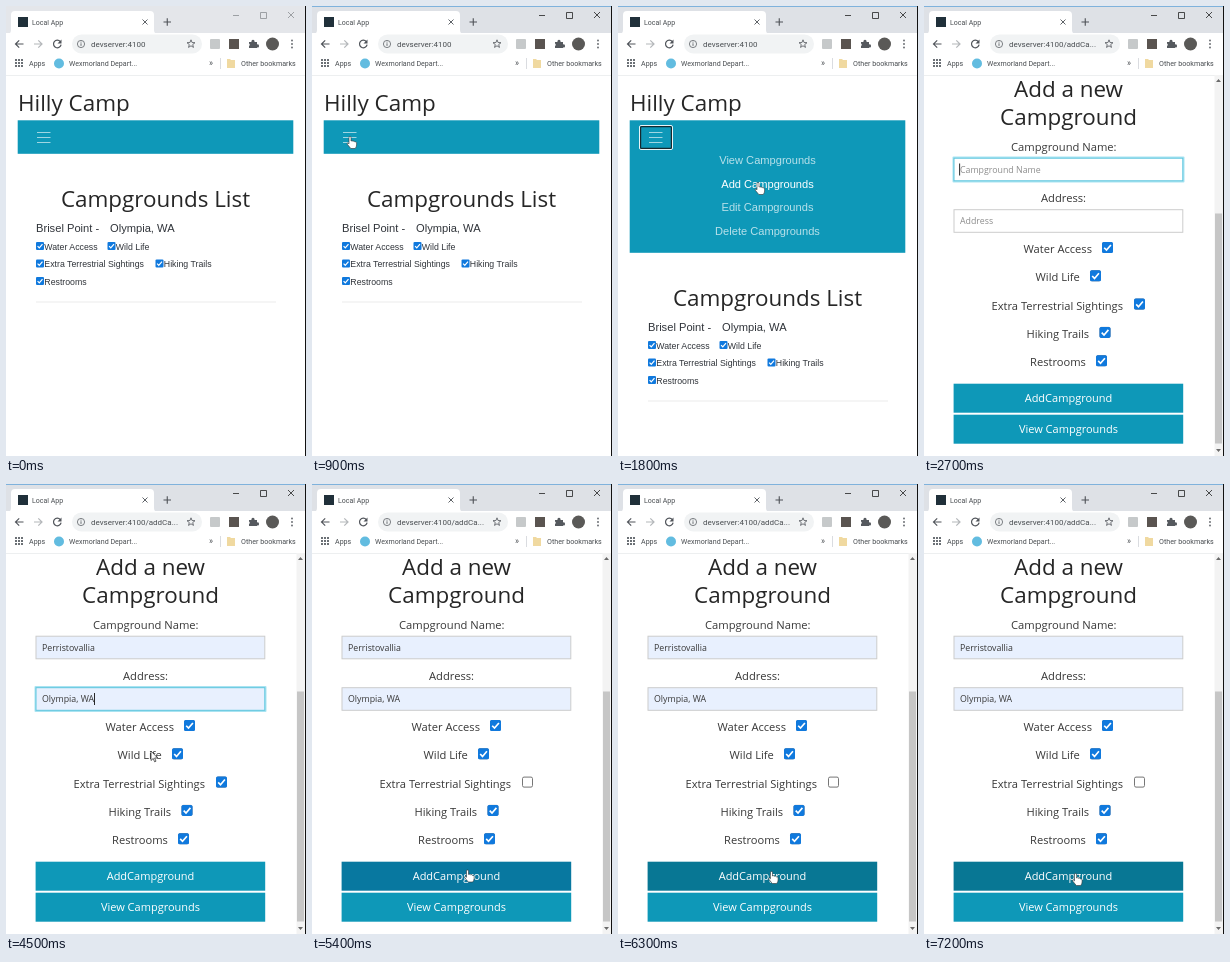
Recreate the animation shown at these times as an HTML page. Size 300 px wide and 450 px high, loop 8 s.

```html
<!DOCTYPE html>
<html lang="en">
<head>
<meta charset="utf-8">
<title>Campgrounds</title>
<style>
html, body { margin: 0; width: 100%; height: 100%; overflow: hidden; background: #fff; }
svg { display: block; width: 100%; height: 100%; }
text { white-space: pre; }
.ui { font-family: Roboto, sans-serif; fill: #4a4e52; }
.sans { font-family: "Liberation Sans", Arial, sans-serif; fill: #30343a; }
.open { font-family: "Open Sans", sans-serif; fill: #383838; }
.head { font-family: "Open Sans", sans-serif; fill: #262626; }
.mid { text-anchor: middle; }
</style>
</head>
<body>
<svg id="stage" viewBox="0 0 300 450"></svg>
<script>
const TEAL = '#0e98b8', HOVER = '#087794', BLUE = '#1079dd';
const STEP = 900, LOOP = 8000;

const rect = (x, y, w, h, fill, more = '') =>
  `<rect x="${x}" y="${y}" width="${w}" height="${h}" fill="${fill}" ${more}/>`;
const path = (d, stroke, width = 1, more = '') =>
  `<path d="${d}" fill="none" stroke="${stroke}" stroke-width="${width}" ${more}/>`;
const text = (cls, x, y, size, str, more = '') =>
  `<text class="${cls}" x="${x}" y="${y}" font-size="${size}" ${more}>${str}</text>`;
const group = (id, body, more = '') => `<g id="${id}" ${more}>${body}</g>`;
const dot = (x, y, r, fill) => `<circle cx="${x}" cy="${y}" r="${r}" fill="${fill}"/>`;

const tick = (x, y, s) => rect(x, y, s, s, BLUE, `rx="${s * .14}"`) +
  path(`M${x + s * .2} ${y + s * .52}l${s * .21} ${s * .22}l${s * .4} ${-s * .47}`, '#fff', s * .15);

function browser() {
  const star = Array.from({ length: 10 }, (_, i) => {
    const a = i * Math.PI / 5, r = i % 2 ? 1.8 : 4.2;
    return `${185 + r * Math.sin(a)},${38 - r * Math.cos(a)}`;
  }).join(' ');
  let apps = '';
  for (let i = 0; i < 9; i++) apps += rect(9 + i % 3 * 3, 53 + (i / 3 | 0) * 3, 2, 2, '#6b7075');
  return rect(0, 0, 300, 28, '#e4e6ea', 'id="strip"') +
    rect(0, 0, 300, 1, '#7fb2dc', 'id="edge"') +
    `<path d="M1 28q4 0 4-4V9q0-4 4-4H144q4 0 4 4V24q0 4 4 4z" fill="#fff"/>` +
    rect(12, 11, 10, 10, '#20303a') +
    text('ui', 26, 18.7, 7, 'Local App') +
    path('M136.5 13.5l5 5m0-5l-5 5', '#5f6368') +
    path('M157.500 16h7.500M161.250 12.250v7.500', '#4d5156', 1.1) +
    group('controls', path('M227 9.500h6M254.500 6.500h6v6h-6zM282 6l6 6m0-6l-6 6', 'currentColor', .8)) +
    rect(0, 27, 300, 42, '#fff') +
    path('M17.500 38H9.500m3.700-3.700L9.500 38l3.700 3.700', '#50545a', 1.2) +
    path('M28 38h8m-3.700-3.700L36 38l-3.700 3.700', '#b4b7ba', 1.2) +
    path('M54.300 35.600a3.800 3.800 0 1 0 .8 3', '#50545a', 1.2) +
    '<path d="M55.500 33.500v4h-4z" fill="#50545a"/>' +
    rect(66, 28.5, 130, 19, '#f1f3f4', 'rx="9.500"') +
    '<circle cx="75" cy="38" r="3.600" fill="none" stroke="#5f6368" stroke-width=".8"/>' +
    path('M75 37.300v2.600M75 35.700v.9', '#5f6368', .9) +
    text('ui', 85, 40.8, 8, 'devserver:4100<tspan id="route">/addCa...</tspan>') +
    `<polygon points="${star}" fill="none" stroke="#5f6368" stroke-width=".9"/>` +
    rect(204, 33, 10, 10, '#c6c9ca', 'rx="1"') +
    rect(223, 33, 10, 10, '#5a5450') +
    '<path d="M243 36h2.500a1.600 1.600 0 1 1 3 0H251v2.500a1.500 1.500 0 1 1 0 2.800V42h-8v-2a1.500 1.500 0 0 0 0-2.600z" fill="#55595e"/>' +
    dot(266.5, 38, 6.5, '#5a5957') +
    [34.5, 38, 41.5].map(y => dot(286, y, .9, '#5f6368')).join('') +
    apps + text('ui', 23, 59.8, 7.1, 'Apps') +
    dot(53, 57.5, 5, '#62bce0') +
    text('ui', 63, 59.8, 7.1, 'Wexmorland Depart...') +
    text('ui', 203, 60, 8.5, '»') +
    rect(214, 52, 1, 11, '#dadce0') +
    '<path d="M221 53h3l1 1h4v8h-8z" fill="#f0d9a0"/>' +
    text('ui', 235, 59.8, 7.15, 'Other bookmarks') +
    rect(0, 69, 299, .6, '#e2e4e6');
}

function listPage() {
  const menu = ['View', 'Add', 'Edit', 'Delete'].map((verb, i) =>
    text('sans mid', 149.5, 158.2 + i * 23.6, 11.1, verb + ' Campgrounds',
      `style="fill:#fff" opacity="${i === 1 ? 1 : .7}"`)).join('');
  const tags = [
    [30, 236, 'Water Access'], [101.5, 236, 'Wild Life'],
    [30, 253.5, 'Extra Terrestrial Sightings'], [149.5, 253.5, 'Hiking Trails'],
    [30, 271, 'Restrooms']
  ].map(([x, y, s]) => tick(x, y, 8) + text('sans', x + 8.3, y + 7.8, 8.78, s)).join('');
  return text('head', 12, 105, 22.4, 'Hilly Camp') +
    rect(11.7, 114.3, 275.6, 33.5, TEAL, 'id="nav"') +
    path('M31 126.500h13.500M31 131.500h13.500M31 136.500h13.500', '#fff', 1, 'opacity=".6"') +
    group('menu', menu +
      rect(21.5, 119.5, 33, 24, 'none', 'rx="1.500" stroke="#e8f4f7"') +
      rect(22.6, 120.6, 30.8, 21.8, 'none', 'rx="1" stroke="#16282e" stroke-width="1.200"')) +
    group('list', text('head mid', 149.5, 200.5, 22.4, 'Campgrounds List') +
      text('sans', 30, 226, 11.15, 'Brisel Point -') +
      text('sans', 104, 226, 11.15, 'Olympia, WA') +
      tags + rect(30, 295.5, 240, 1, '#ececec'));
}

const field = (id, y, hint, value, caret) =>
  rect(28.5, y - 1.5, 232, 26, '#a9e3f1', `id="${id}Ring" rx="1"`) +
  rect(30, y + .2, 228.8, 22.6, '#fff', `id="${id}Box" stroke="#ccc"`) +
  text('open', 36, y + 14.6, 8.8, hint, `id="${id}Hint" style="fill:#8d8d8d"`) +
  text('open', 36, y + 14.6, 8.8, value, `id="${id}Value"`) +
  rect(caret, y + 5.5, .9, 12, '#111', `id="${id}Caret"`);

function formPage() {
  const boxes = [
    [99.5, 178, 'Water Access'], [111.5, 166, 'Wild Life'],
    [67.5, 210, 'Extra Terrestrial Sightings'], [102.5, 175.5, 'Hiking Trails'],
    [106, 172, 'Restrooms']
  ].map(([x, bx, s], i) => {
    const y = 247 + i * 28.3;
    const off = rect(bx + .5, y - 10.5, 10, 10, '#fff', 'rx="1.500" stroke="#767676"');
    return text('open', x, y, 11.15, s) + off +
      group('tick' + i, tick(bx, y - 11, 11));
  }).join('');
  const button = (id, y, label) => rect(29.6, y, 229.6, 29, TEAL, `id="${id}"`) +
    text('head mid', 144.5, y + 18.7, 11, label, 'style="fill:#fff"');
  return text('head mid', 144.5, 91, 22.4, 'Add a new') +
    text('head mid', 144.5, 119, 22.4, 'Campground') +
    text('open', 87, 145, 11.2, 'Campground Name:') +
    field('name', 152, 'Campground Name', 'Perristovallia', 35.2) +
    text('open', 117, 196, 11.2, 'Address:') +
    field('addr', 203.5, 'Address', 'Olympia, WA', 88.2) +
    boxes + button('add', 377.7, 'AddCampground') + button('view', 408.7, 'View Campgrounds') +
    rect(290.5, 69, 8.5, 381, '#f3f3f3') + rect(291, 207.5, 7, 230, '#c6c6c6') +
    '<path d="M292 76l2.500-3 2.500 3zM292 443l2.500 3 2.500-3z" fill="#6b6b6b"/>';
}

// Both pointers have their tip at 0,0.
const hand = '<path d="M-1 .6Q-1-.6 0-.6T1 .6V4l1-.3 1 .5 1-.1.8.7 1 .1.8.8V8Q6.500 10 5.200 11.500H.8L-2.700 7.200q-.6-1.300.7-1.300L-1 6.800z" fill="#fff" stroke="#333" stroke-width=".6"/>';
const arrow = '<path d="M0 0V9.500L2.200 7.500 3.600 10.800 5 10.200 3.600 7H6.600z" fill="#fff" stroke="#222" stroke-width=".7"/>';

const stage = document.getElementById('stage');
stage.innerHTML = rect(0, 0, 300, 450, '#fff') + browser() +
  group('home', listPage()) + group('form', formPage()) +
  rect(299, 0, 1, 450, '#111') + group('hand', hand) + group('arrow', arrow);

const el = {};
stage.querySelectorAll('[id]').forEach(n => el[n.id] = n);
const show = (id, on) => el[id].style.display = on ? '' : 'none';
const set = (id, key, value) => el[id].setAttribute(key, value);

const filled = { form: 1, name: 1, addr: 1 };
const steps = [
  { idle: 1 },
  { hand: [38, 131] },
  { menu: 1, hand: [140, 177] },
  { form: 1, focus: 'name' },
  { form: 1, name: 1, focus: 'name' },
  { ...filled, focus: 'addr', arrow: [145, 267] },
  { ...filled, off: 1, hover: '#0878a0', hand: [155.5, 386.5] },
  { ...filled, off: 1, hover: HOVER, hand: [153.5, 388] },
  { ...filled, off: 1, hover: HOVER, hand: [151.5, 390] }
];

function draw(s) {
  set('strip', 'fill', s.idle ? '#e4e6ea' : '#dee1e6');
  set('controls', 'color', s.idle ? '#8b8e92' : '#222');
  show('edge', !s.idle);
  show('home', !s.form);
  show('form', s.form);
  show('route', s.form);
  show('menu', s.menu);
  set('nav', 'height', s.menu ? 132.5 : 33.5);
  set('list', 'transform', `translate(0 ${s.menu ? 99 : 0})`);
  for (const id of ['name', 'addr']) {
    const focus = s.focus === id;
    show(id + 'Ring', focus);
    show(id + 'Hint', !s[id]);
    show(id + 'Value', s[id]);
    show(id + 'Caret', focus);
    set(id + 'Box', 'fill', s[id] ? '#e8f0fe' : '#fff');
    set(id + 'Box', 'stroke', focus ? '#5fc6de' : '#ccc');
  }
  set('nameCaret', 'x', s.name ? 36 + el.nameValue.getComputedTextLength() : 35.2);
  set('addrCaret', 'x', 36 + el.addrValue.getComputedTextLength());
  show('tick2', !s.off);
  set('add', 'fill', s.hover || TEAL);
  for (const id of ['hand', 'arrow']) {
    show(id, s[id]);
    if (s[id]) set(id, 'transform', `translate(${s[id]})`);
  }
}

const start = performance.now();
let last = -1;
function tickFrame(now) {
  const i = Math.floor(Math.max(0, now - start) % LOOP / STEP);
  if (i !== last) draw(steps[last = i]);
  requestAnimationFrame(tickFrame);
}
tickFrame(start);
</script>
</body>
</html>
```
